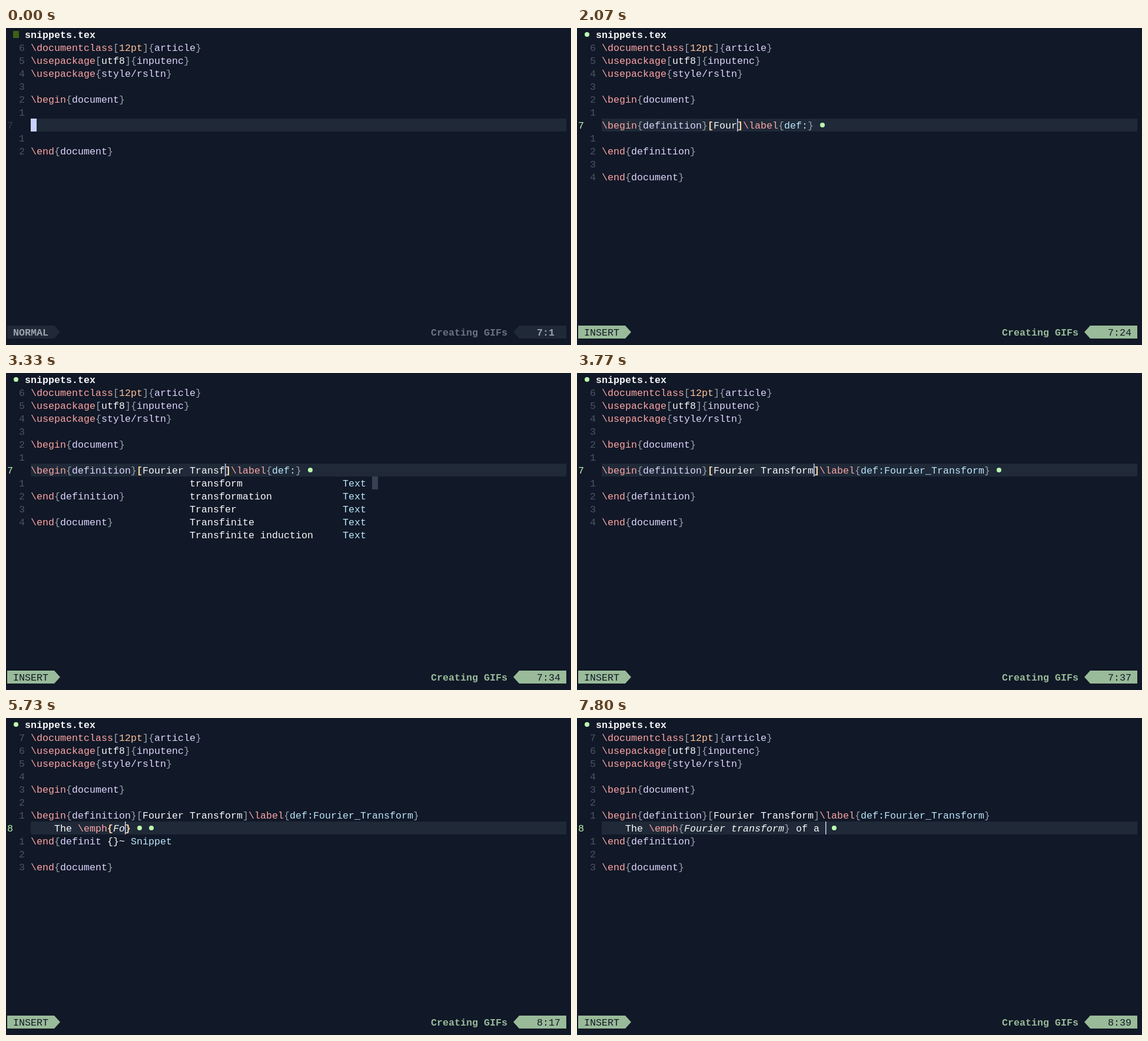
These frames come from a looping animation (960 px wide and 539 px high, 8000 ms). An HTML page with a canvas:

```html
<!DOCTYPE html>
<html lang="en">
<head>
<meta charset="utf-8">
<title>Typing with snippets</title>
<style>
  html, body { margin: 0; width: 100%; height: 100%; overflow: hidden; background: #111827; }
  canvas { display: block; }
</style>
</head>
<body>
<canvas id="stage" width="960" height="539"></canvas>
<script>
const ctx = document.getElementById("stage").getContext("2d");
const LOOP = 8000, CELL = 10, ROW = 22, LEFT = 42;
const FAMILY = '"Liberation Mono", "Noto Sans Mono", monospace';
const C = {
  bg: "#111827", line: "#1f2937", gutter: "#4b5563", dimGutter: "#374151",
  text: "#f9fafb", grey: "#9ca3af", muted: "#6b7280", command: "#fca5a5",
  arg: "#ddd6fe", option: "#fec49a", match: "#fed7aa", label: "#bae6fd",
  cursor: "#c7d2fe", green: "#bbf7b0", status: "#99bb99", icon: "#3d6117"
};

// Font size at which one character is exactly one cell wide
ctx.font = `100px ${FAMILY}`;
const SIZE = CELL * 100 / ctx.measureText("M").width;

function rect(x, y, w, h, color) {
  ctx.fillStyle = color;
  ctx.fillRect(x, y, w, h);
}

function write(text, x, row, color, style = "") {
  ctx.font = `${style} ${SIZE}px ${FAMILY}`;
  ctx.fillStyle = color;
  ctx.fillText(text, x, row * ROW + 17);
}

function dot(x, row) {
  ctx.fillStyle = C.green;
  ctx.beginPath();
  ctx.arc(x, row * ROW + 11, 4, 0, 7);
  ctx.fill();
}

// Writes one line of LaTeX with highlighting; columns in `pair` are matched brackets
function writeCode(code, row, pair) {
  let command = "", open = "";
  for (const m of code.matchAll(/\\\w+|[{}[\]]|[^\\{}[\]]+/g)) {
    const token = m[0], x = LEFT + m.index * CELL;
    let color = C.text, style = "";
    if (token[0] === "\\") {
      command = token;
      color = C.command;
    } else if ("{}[]".includes(token)) {
      open = "{[".includes(token) ? token : "";
      color = C.grey;
      if (pair.includes(m.index)) {
        color = C.match;
        style = "bold";
      }
    } else if (open === "[") {
      color = token === "12pt" ? C.option : C.text;
    } else if (open === "{") {
      if (command === "\\emph") style = "italic";
      else color = command === "\\label" ? C.label : C.arg;
    }
    write(token, x, row, color, style);
  }
}

const typed = (text, times, t) => text.slice(0, times.filter(at => t >= at).length);

const HEAD = ["\\documentclass[12pt]{article}", "\\usepackage[utf8]{inputenc}",
  "\\usepackage{style/rsltn}", "", "\\begin{document}", ""];
const TITLE = "Fourier Transform";
const TITLE_KEYS = [1670, 1730, 1830, 1970, 2100, 2200, 2270, 2370, 2500,
  2570, 2630, 2830, 3170, 3330, 3470, 3570, 3630];
const THE_KEYS = [4100, 4140, 4170, 4370];
const EMPH_KEYS = [5170, 5200, 5230, 5270];
const TERM_KEYS = [5630, 5730, 5930, 6000, 6100, 6200, 6270, 6400,
  6570, 6630, 6700, 6770, 6830, 6900, 6970, 7030, 7170];
const REST_KEYS = [7370, 7430, 7500, 7670, 7730, 7800];

const WORDS = ["transform", "transformation", "Transfer", "Transfinite", "Transfinite induction"];
const SNIPPETS = ["tfae~", "text~", "theorem~", "tikzpicture~", "table~"];

// from, to, x of the items, x of the kinds, kind, items, long list
const POPUPS = [
  [1370, 1670, 222, 262, "Snippet", ["[]~"]],
  [1670, 1970, 232, 282, "Snippet", ["ff~", "fr~", "fn~"]],
  [2570, 2830, 312, 472, "Snippet", SNIPPETS, true],
  [2830, 3470, 312, 572, "Text", WORDS, true],
  [3470, 3700, 312, 472, "Text", WORDS.slice(0, 2)],
  [5500, 5930, 172, 212, "Snippet", ["{}~"]],
  [6630, 6970, 262, 522, "Text", WORDS, true],
  [6970, 7270, 262, 422, "Text", WORDS.slice(0, 2)]
];

// Buffer lines, cursor place, matched brackets and jump marks at time t
function editor(t) {
  if (t < 1300) {
    const key = typed("de", [1030, 1100], t);
    return { lines: [...HEAD, key, "", "\\end{document}"], row: 7, col: key.length, pair: [], marks: 0 };
  }
  let begin = "\\begin{definition}", body = "", row = 7, col = begin.length, pair = [], marks = 1;
  if (t >= 1370) {
    const title = typed(TITLE, TITLE_KEYS, t);
    pair = [col, col + title.length + 1];
    col = pair[1];
    begin += `[${title}]`;
  }
  begin += `\\label{def:${t >= 3700 ? TITLE.replace(" ", "_") : ""}}`;

  if (t >= 3830) {
    row = 8;
    pair = [];
    body = "    " + typed("The ", THE_KEYS, t);
    if (t < 5430) {
      body += typed("emph", EMPH_KEYS, t);
      col = body.length;
    } else {
      body += "\\emph";
      col = body.length;
      if (t >= 5500) {
        const term = typed("Fourier transform", TERM_KEYS, t);
        pair = [col, col + term.length + 1];
        body += `{${term}}`;
        col = pair[1];
        marks = 2;
      }
      if (t >= 7270) {
        body += typed(" of a ", REST_KEYS, t);
        col = body.length;
        pair = [];
        marks = 1;
      }
    }
  }
  return { lines: [...HEAD, begin, body, "\\end{definition}", "", "\\end{document}"], row, col, pair, marks };
}

function drawPopup(row, [, , x, kindX, kind, items, long]) {
  const end = kindX + (kind.length + 1) * CELL;
  rect(x - CELL, row * ROW, end - x + CELL, items.length * ROW, C.bg);
  items.forEach((item, i) => {
    write(item, x, row + i, C.text);
    write(kind, kindX, row + i, C.label);
  });
  if (long) rect(end, row * ROW, CELL, ROW, C.dimGutter);
}

function drawStatus(insert, place) {
  const y = 23 * ROW, fill = insert ? C.status : C.line;
  const ink = insert ? C.bg : C.grey, weight = insert ? "" : "bold";
  ctx.fillStyle = fill;
  for (const [flat, tip] of [[2, 92], [952, 862]]) {
    const shoulder = tip + Math.sign(flat - tip) * CELL;
    ctx.beginPath();
    ctx.moveTo(flat, y);
    ctx.lineTo(shoulder, y);
    ctx.lineTo(tip, y + ROW / 2);
    ctx.lineTo(shoulder, y + ROW);
    ctx.lineTo(flat, y + ROW);
    ctx.fill();
  }
  write(insert ? "INSERT" : "NORMAL", 12, 23, ink, weight);
  write("Creating GIFs", 722, 23, insert ? C.status : C.muted, "bold");
  write(place, 902, 23, ink, weight);
}

function draw(t) {
  const { lines, row, col, pair, marks } = editor(t);
  const insert = t >= 630, cursorX = LEFT + col * CELL;

  rect(0, 0, 960, 539, C.bg);
  if (t < 1030) rect(12, 5, 10, 12, C.icon);
  else dot(17, 0);
  write("snippets.tex", 32, 0, C.text, "bold");

  rect(LEFT, row * ROW, 910, ROW, C.line);
  lines.forEach((code, i) => {
    const n = i + 1;
    if (n === row) write(n, 2, n, insert ? C.green : C.dimGutter);
    else write(Math.abs(n - row), 22, n, C.gutter);
    writeCode(code, n, n === row ? pair : []);
  });
  const end = LEFT + lines[row - 1].length * CELL;
  for (let i = 0; i < marks; i++) dot(end + 15 + i * 20, row);

  for (const popup of POPUPS) {
    if (t >= popup[0] && t < popup[1]) drawPopup(row + 1, popup);
  }
  rect(cursorX, row * ROW, insert ? 1.5 : CELL, ROW, C.cursor);
  drawStatus(insert, `${row}:${col + 1}`);
}

const start = performance.now();
function tick() {
  draw((performance.now() - start) % LOOP);
  requestAnimationFrame(tick);
}
tick();
</script>
</body>
</html>
```
